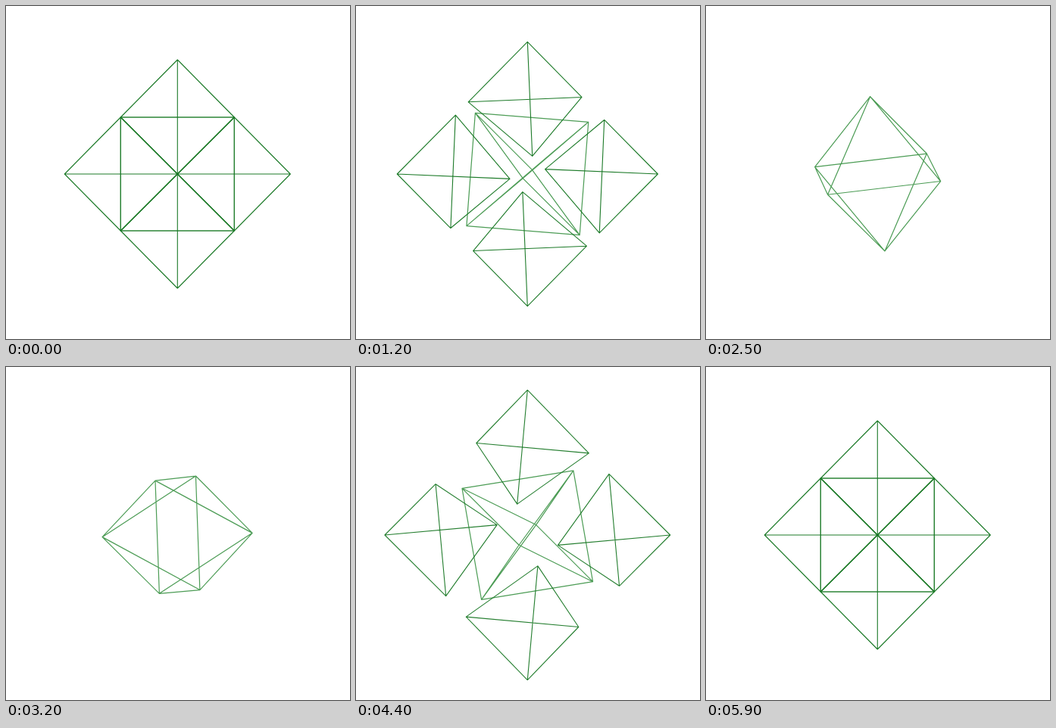
These frames come from a looping animation (454x440 px, 6 s). An HTML page:

```html
<!DOCTYPE html>
<html lang="en">
<head>
<meta charset="utf-8">
<title>Tetrahedron dissection</title>
<style>
  html, body { margin: 0; width: 100%; height: 100%; overflow: hidden; background: #fff; }
  svg { display: block; width: 454px; height: 440px; }
  path { fill: none; stroke-linejoin: round; stroke-linecap: round; }
  #core { stroke: #4c9c55; stroke-width: 1.2; }
  .tip { stroke: #1c7a28; stroke-width: 1.1; }
</style>
</head>
<body>
<svg id="stage" viewBox="0 0 454 440">
  <path id="core"/>
  <path class="tip"/><path class="tip"/><path class="tip"/><path class="tip"/>
</svg>
<script>
const STEP = 100, COUNT = 60;
const CX = 226.3, CY = 222, SIZE = 150, DEPTH = SIZE / Math.SQRT2, CAMERA = 16000;
const SPREAD = 77 / SIZE;

// z points away from the viewer
const corners = [
  [0, -SIZE, -DEPTH], [0, SIZE, -DEPTH],
  [-SIZE, 0, DEPTH], [SIZE, 0, DEPTH]
];
const core = document.getElementById('core');
const tips = [...document.querySelectorAll('.tip')];

const add = (a, b) => a.map((v, i) => v + b[i]);
const scale = (a, k) => a.map(v => v * k);
const dot = (a, b) => a.reduce((sum, v, i) => sum + v * b[i], 0);
const cross = (a, b) => [
  a[1] * b[2] - a[2] * b[1],
  a[2] * b[0] - a[0] * b[2],
  a[0] * b[1] - a[1] * b[0]
];
const unit = a => scale(a, 1 / Math.hypot(...a));
const mid = (a, b) => scale(add(a, b), 0.5);
const clamp = v => Math.max(0, Math.min(1, v));

function rotate(p, axis, degrees) {
  const angle = degrees * Math.PI / 180, c = Math.cos(angle), s = Math.sin(angle);
  return add(add(scale(p, c), scale(cross(axis, p), s)),
    scale(axis, dot(axis, p) * (1 - c)));
}

// seventh-order smooth step
const ease = x => x ** 4 * (35 - 84 * x + 70 * x * x - 20 * x ** 3);

function project([x, y, z]) {
  const k = CAMERA / (CAMERA + z);
  return (CX + x * k).toFixed(2) + ' ' + (CY + y * k).toFixed(2);
}

function allPairs(list) {
  return list.flatMap((a, i) => list.slice(i + 1).map(b => [a, b]));
}

function wire(pairs) {
  return pairs.map(([a, b]) => 'M' + project(a) + 'L' + project(b)).join('');
}

// octahedron: midpoints of the big edges, joined unless opposite
const coreEdges = allPairs(allPairs(corners).map(([a, b]) => mid(a, b)))
  .filter(([a, b]) => Math.hypot(...add(a, b)) > 1);
const coreAxis = [0.5, 0.5, Math.SQRT1_2];

const tipEdges = corners.map(c => allPairs(corners.map(o => mid(c, o))));

function draw(time) {
  const x = Math.floor(time / STEP) % COUNT / (COUNT - 1);
  const near = Math.min(x, 1 - x);
  const turn = ease(x), open = ease(clamp(2 * near)) * SPREAD;
  const fade = clamp((0.375 - near) / 0.125);

  core.setAttribute('d', wire(coreEdges.map(edge =>
    edge.map(p => rotate(p, coreAxis, 180 * turn)))));

  tips.forEach((el, i) => {
    const axis = unit(corners[i]), shift = scale(corners[i], open);
    el.setAttribute('d', wire(tipEdges[i].map(edge =>
      edge.map(p => add(rotate(p, axis, 120 * turn), shift)))));
    el.setAttribute('opacity', fade.toFixed(3));
  });
}

const start = performance.now();
function tick() {
  draw(performance.now() - start);
  requestAnimationFrame(tick);
}
draw(0);
requestAnimationFrame(tick);
</script>
</body>
</html>
```
